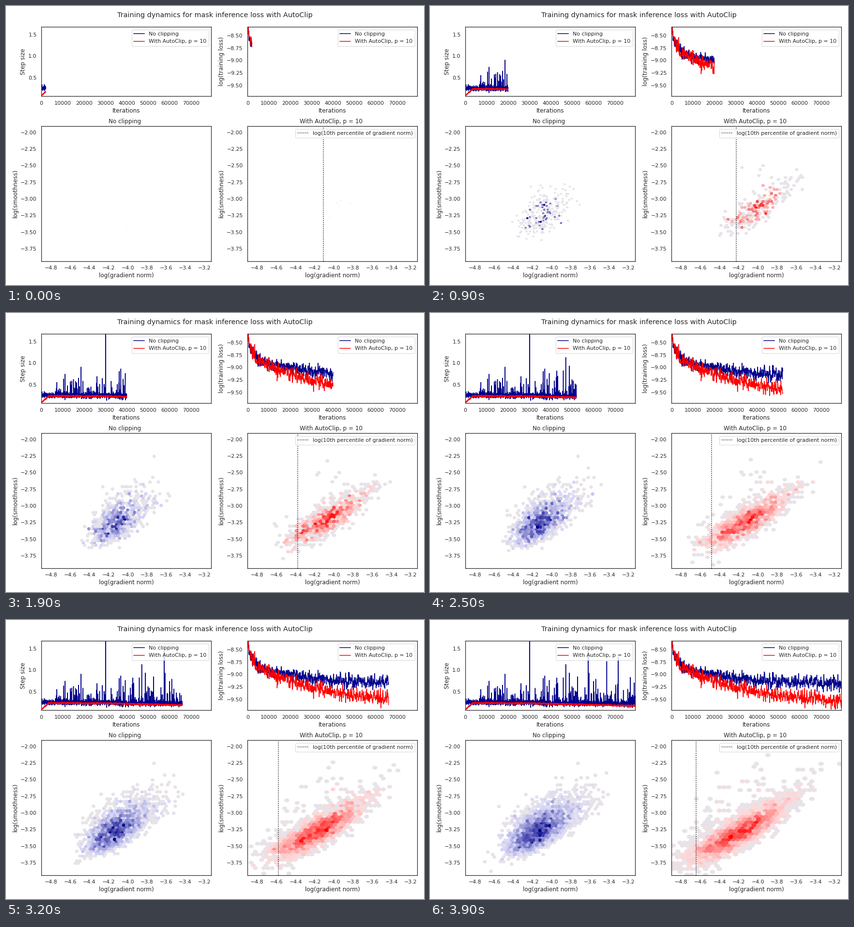
A matplotlib script that plays this animation: 864x576 px, repeating every 6000 ms.

```python
import numpy as np
import matplotlib.pyplot as plt
from matplotlib.animation import FuncAnimation
from matplotlib.colors import LinearSegmentedColormap

W, H, DPI = 864, 576, 72
STEPS, FRAMES, INTERVAL = 40, 60, 100
CHUNK = 2000  # iterations revealed per step
INK = "0.15"
BLUE, RED = "darkblue", "red"

plt.rcParams.update({
    "font.family": "DejaVu Sans", "font.size": 12,
    "axes.titlesize": 12, "axes.labelsize": 12, "legend.fontsize": 11,
    "xtick.labelsize": 11, "ytick.labelsize": 11,
    "xtick.major.size": 6, "ytick.major.size": 6,
    "xtick.bottom": False, "ytick.left": False,
    "axes.linewidth": 1.25, "axes.edgecolor": INK, "axes.labelcolor": INK,
    "text.color": INK, "xtick.color": INK, "ytick.color": INK,
    "lines.linewidth": 1.5, "patch.linewidth": 1,
})

rng = np.random.default_rng(7)


# ---------- curves ----------
def step_curves():
    it = np.arange(0, 80001, 40)
    n = len(it)
    base = .25 - .04 * it / 80000
    bursts = rng.exponential(.17, n).clip(0, .68) * (rng.random(n) < .14)
    plain = base + .033 * rng.normal(size=n)
    plain += bursts * np.interp(it, [3000, 14000], [0, 1])
    for at, top in [(30100, 1.8), (47000, 1.13), (57500, 1.43),
                    (66200, 1.2), (71600, 1.3)]:
        plain[at // 40] = top
    clip = np.interp(it, [0, 800, 3500, 30000, 80000],
                     [.09, .11, .235, .225, .165])
    return it, plain.clip(.12), clip + .01 * rng.normal(size=n)


def loss_curves():
    it = np.arange(0, 80001, 80)
    x = it / 1000
    decay = np.exp(-x / 1.6)
    plain = -8.82 - .4 * (1 - np.exp(-x / 32)) + .56 * decay
    clip = -8.76 - .86 * (1 - np.exp(-x / 35)) + .48 * decay

    def noise():
        z = rng.normal(size=len(it) + 1)
        return .06 * (z[1:] + .6 * z[:-1])

    dip = .12 * np.exp(-((x - 49.5) / .25) ** 2)
    return it, plain + noise() - dip, clip + noise() - dip


# ---------- point clouds ----------
def cloud(first, model):
    """Rows of (step of appearance, x, y)."""
    k = np.arange(STEPS)
    total = (20 * k + 1.3 * k ** 2).astype(int)
    born = np.repeat(k[1:], np.diff(total))
    x, y = model(born / (STEPS - 1), *rng.normal(size=(2, len(born))))
    start = [(0, *p) for p in first]
    return np.vstack([start, np.column_stack([born, x, y])])


def plain_model(t, u, v):
    x = -4.05 - .1 * t + (.14 + .075 * t) * (u + .08 * (u * u - 1))
    d = x + 4.05
    return x, -3.18 + .76 * d + .2 * d * d + .155 * (v + .1 * (v * v - 1))


def clip_model(t, u, v):
    x = -3.96 - .38 * t + (.16 + .15 * t) * (u + .06 * (u * u - 1))
    d = x + 4
    stray = rng.exponential(.25, len(t)) * (rng.random(len(t)) < .07)
    return x, -3.14 + .88 * d + .2 * d * d + .11 * v + stray


plain_pts = cloud([(-4.10, -3.62), (-4.02, -3.50), (-4.015, -3.44)], plain_model)
clip_pts = cloud([(-4.05, -3.29), (-3.95, -3.11), (-3.965, -3.06),
                  (-3.93, -3.03), (-3.83, -3.07)], clip_model)

# extent of each cloud (x0, x1, y0, y1) at the key steps
KEYS = [0, 9, 19, 39]
PLAIN_BOX = [(-4.10, -4.01, -3.63, -3.43), (-4.44, -3.70, -3.62, -2.78),
             (-4.58, -3.42, -3.84, -2.22), (-4.70, -3.38, -3.88, -2.22)]
CLIP_BOX = [(-4.06, -3.82, -3.30, -3.02), (-4.40, -3.23, -3.67, -2.29),
            (-4.62, -3.20, -3.83, -2.22), (-5.03, -3.10, -4.02, -2.00)]


def extent(boxes, k):
    return [np.interp(k, KEYS, side) for side in zip(*boxes)]


def percentile(k):
    return np.interp(k, [0, 9, 19, 25, 32, 39],
                     [-4.11, -4.225, -4.376, -4.482, -4.578, -4.648])


# ---------- layout ----------
fig = plt.figure(figsize=(W / DPI, H / DPI), dpi=DPI, facecolor="white")
fig.suptitle("Training dynamics for mask inference loss with AutoClip",
             fontsize=14.4)


def panel(x, top, bottom, xlim, ylim, xticks, yticks, xlabel, ylabel):
    ax = fig.add_axes([x / W, 1 - bottom / H, 351.1 / W, (bottom - top) / H])
    ax.set(xlim=xlim, ylim=ylim, xticks=xticks, yticks=yticks,
           xlabel=xlabel, ylabel=ylabel)
    return ax


LEFT, RIGHT = 73.1, 499.3
UPPER, LOWER = (43, 186), (248, 526.7)
ITER = (0, 79520)
GRAD, SMOOTH = (-4.902, -3.129), (-3.937, -1.907)
its = np.arange(0, 70001, 10000)
grads = np.linspace(-4.8, -3.2, 9).round(1)
smooths = np.linspace(-3.75, -2, 8)

ax_step = panel(LEFT, *UPPER, ITER, (.067, 1.68), its, [.5, 1, 1.5],
                "Iterations", "Step size")
ax_loss = panel(RIGHT, *UPPER, ITER, (-9.718, -8.324), its,
                np.linspace(-9.5, -8.5, 5), "Iterations", "log(training loss)")
ax_plain, ax_clip = [
    panel(x, *LOWER, GRAD, SMOOTH, grads, smooths,
          "log(gradient norm)", "log(smoothness)") for x in (LEFT, RIGHT)]
ax_plain.set_title("No clipping", x=.4926)
ax_clip.set_title("With AutoClip, p = 10", x=.4926)


def pair(ax):
    lines = [ax.plot([], [], color=BLUE, label="No clipping")[0],
             ax.plot([], [], color=RED, label="With AutoClip, p = 10")[0]]
    ax.legend(loc="upper right")
    return lines


curves = [(pair(ax_step), step_curves()), (pair(ax_loss), loss_curves())]
cut = ax_clip.axvline(percentile(0), color="black", ls=":",
                      label="log(10th percentile of gradient norm)")
ax_clip.legend(loc="upper right")


def ramp(pale, full):
    return LinearSegmentedColormap.from_list(
        full, [(0, "#e8e3e8"), (.07, pale), (1, full)])


clouds = [(ax_plain, plain_pts, PLAIN_BOX, ramp("#d8d8f8", BLUE)),
          (ax_clip, clip_pts, CLIP_BOX, ramp("#ffd8d8", RED))]
hexes = []


def draw(frame):
    k = min(frame, STEPS - 1)
    for lines, (it, *values) in curves:
        shown = it <= (k + 1) * CHUNK
        for line, v in zip(lines, values):
            line.set_data(it[shown], v[shown])
    while hexes:
        hexes.pop().remove()
    for ax, pts, boxes, cmap in clouds:
        _, x, y = pts[pts[:, 0] <= k].T
        hexes.append(ax.hexbin(x, y, gridsize=40, mincnt=1, cmap=cmap,
                               extent=extent(boxes, k)))
        ax.set(xlim=GRAD, ylim=SMOOTH)
    cut.set_xdata([percentile(k)] * 2)
    return hexes


anim = FuncAnimation(fig, draw, frames=FRAMES, interval=INTERVAL, repeat=True)
plt.show()
```
